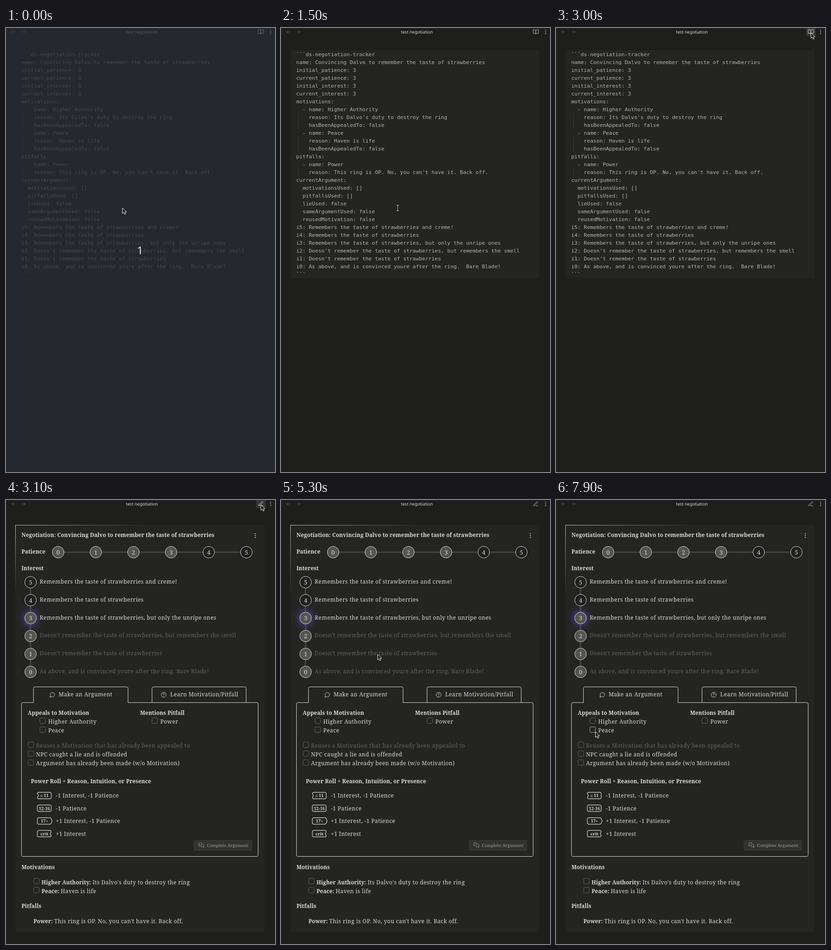
Write an HTML page with a canvas that moves like this. It is 583 by 961 pixels and loops after 8 s.

```html
<!DOCTYPE html>
<html lang="en">
<head>
<meta charset="utf-8">
<title>test negotiation</title>
<style>
html, body { margin: 0; width: 100%; height: 100%; overflow: hidden; background: #1e1e1c; }
canvas { display: block; }
</style>
</head>
<body>
<canvas id="stage" width="583" height="961"></canvas>
<script>
const ctx = document.getElementById('stage').getContext('2d');
const LOOP = 8000, TICK = 100;
const SERIF = '"Noto Serif", serif', SANS = '"Noto Sans", sans-serif';
const REGULAR = `12px ${SERIF}`, BOLD = `bold 11.8px ${SERIF}`;
const TRACKING = { [REGULAR]: '0.43px', [BOLD]: '0.08px' };
const MONO = '11.33px "DejaVu Sans Mono", monospace';
const BG = '#1e1e1c', PANEL = '#242422', LIGHT = '#dadada', DIM = '#62625f';

const GOALS = [
  "Remembers the taste of strawberries and creme!",
  "Remembers the taste of strawberries",
  "Remembers the taste of strawberries, but only the unripe ones",
  "Doesn't remember the taste of strawberries, but remembers the smell",
  "Doesn't remember the taste of strawberries",
  "As above, and is convinced youre after the ring.  Bare Blade!"
];
const TOPIC = 'Convincing Dalvo to remember the taste of strawberries';
const DUTY = "Its Dalvo's duty to destroy the ring";
const REFUSAL = "This ring is OP. No, you can't have it. Back off.";

const SOURCE = `\`\`\`ds-negotiation-tracker
name: ${TOPIC}
initial_patience: 3
current_patience: 3
initial_interest: 3
current_interest: 3
motivations:
  - name: Higher Authority
    reason: ${DUTY}
    hasBeenAppealedTo: false
  - name: Peace
    reason: Haven is life
    hasBeenAppealedTo: false
pitfalls:
  - name: Power
    reason: ${REFUSAL}
currentArgument:
  motivationsUsed: []
  pitfallsUsed: []
  lieUsed: false
  sameArgumentUsed: false
  reusedMotivation: false
${GOALS.map((g, i) => `i${5 - i}: ${g}`).join('\n')}
\`\`\``.split('\n');

const ICONS = {
  back: 'M12 19l-7-7 7-7M19 12H5',
  forward: 'M12 5l7 7-7 7M5 12h14',
  book: 'M2 3h6a4 4 0 0 1 4 4v14a3 3 0 0 0-3-3H2zM22 3h-6a4 4 0 0 0-4 4v14a3 3 0 0 1 3-3h7z',
  pencil: 'M12 20h9M16.5 3.5a2.12 2.12 0 0 1 3 3L7 19l-4 1 1-4Z',
  bubble: 'M7.9 20A9 9 0 1 0 4 16.1L2 22Z',
  help: 'M12 2a10 10 0 1 0 0 20a10 10 0 1 0 0-20M9.1 9a3 3 0 0 1 5.8 1c0 2-3 3-3 3M12 17h.01',
  chats: 'M14 9a2 2 0 0 1-2 2H6l-4 4V4a2 2 0 0 1 2-2h8a2 2 0 0 1 2 2zM18 9h2a2 2 0 0 1 2 2v11l-4-4h-6a2 2 0 0 1-2-2v-1'
};

function text(s, x, y, font = REGULAR, color = LIGHT, align = 'left') {
  ctx.font = font;
  ctx.letterSpacing = TRACKING[font] || '0px';
  ctx.fillStyle = color;
  ctx.textAlign = align;
  ctx.fillText(s, x, y);
}

function icon(name, x, y, color, scale = 0.53) {
  ctx.save();
  ctx.translate(x, y);
  ctx.scale(scale, scale);
  ctx.translate(-12, -12);
  ctx.lineWidth = 1.8;
  ctx.lineCap = ctx.lineJoin = 'round';
  ctx.strokeStyle = color;
  ctx.stroke(new Path2D(ICONS[name]));
  ctx.restore();
}

function box(x, y, w, h, r, fill, stroke) {
  ctx.beginPath();
  ctx.roundRect(x, y, w, h, r);
  if (fill) { ctx.fillStyle = fill; ctx.fill(); }
  if (stroke) { ctx.strokeStyle = stroke; ctx.lineWidth = 1; ctx.stroke(); }
}

function rect(x, y, w, h, color) {
  ctx.fillStyle = color;
  ctx.fillRect(x, y, w, h);
}

function dots(x, y, gap, color) {
  ctx.fillStyle = color;
  for (const k of [-1, 0, 1]) {
    ctx.beginPath();
    ctx.arc(x, y + k * gap, 1.1, 0, 7);
    ctx.fill();
  }
}

function header(mode, hover, ink = LIGHT, arrows = '#555553', tool = '#b0b0ae') {
  if (hover) box(542, 0, 21, 18, [0, 0, 3, 3], '#363635');
  icon('back', 16, 8.5, arrows);
  icon('forward', 38, 8.5, arrows);
  text('test negotiation', 294.5, 12, `9.25px ${SANS}`, ink, 'center');
  icon(mode, 552.3, 8.3, hover ? LIGHT : tool);
  dots(573.5, 8.5, 3.7, tool);
}

function editor(ink, guide) {
  for (const [y, h] of [[184, 34], [235, 34], [303, 17]]) rect(37, y, 1, h, guide);
  SOURCE.forEach((line, i) => text(line, 33, 60.5 + 17 * i, MONO, ink));
}

function countdown() {
  rect(0, 0, 583, 961, '#25282f');
  header('book', false, '#55585c', '#3a3d42', '#6d7074');
  editor('#45484c', '#2d3036');
  text('1', 290.5, 489.5, `23px ${SANS}`, '#e4e4e4', 'center');
}

function node(n, x, y, filled, glow) {
  ctx.save();
  if (glow) { ctx.shadowColor = '#6a50e0'; ctx.shadowBlur = 17; }
  ctx.beginPath();
  ctx.arc(x, y, 12.6, 0, 7);
  ctx.fillStyle = filled ? '#545453' : '#20201e';
  ctx.fill();
  ctx.restore();
  ctx.strokeStyle = LIGHT;
  ctx.lineWidth = 1;
  ctx.stroke();
  text(n, x, y + 4.7, `13px ${SERIF}`, LIGHT, 'center');
}

function check(x, y, color = '#62625f') {
  box(x + .5, y + .5, 12, 12, 2.5, null, color);
}

function fade(x, y, w, h) {
  const g = ctx.createLinearGradient(x, y, w > h ? x + w : x, w > h ? y : y + h);
  g.addColorStop(0, '#c4c4c2');
  g.addColorStop(1, 'rgba(196,196,194,0)');
  rect(x, y, w, h, g);
}

// Outcome badge; left and right edges bend by l and r pixels.
function badge(label, y, l, r) {
  ctx.beginPath();
  ctx.moveTo(70, y - 7);
  ctx.lineTo(96, y - 7);
  ctx.lineTo(98, y - 5);
  ctx.lineTo(98 + r, y);
  ctx.lineTo(98, y + 5);
  ctx.lineTo(96, y + 7);
  ctx.lineTo(70, y + 7);
  ctx.lineTo(68, y + 5);
  ctx.lineTo(68 + l, y);
  ctx.lineTo(68, y - 5);
  ctx.closePath();
  ctx.strokeStyle = LIGHT;
  ctx.lineWidth = 1.2;
  ctx.stroke();
  text(label, 83.3, y + 3.4, `bold 9.4px ${SERIF}`, LIGHT, 'center');
}

function entry(name, rest, x, y) {
  text(name, x, y, BOLD);
  const w = ctx.measureText(name + ' ').width;
  text(rest, x + w, y);
}

function tracker(hoverPeace) {
  rect(21, 54, 539, 881, PANEL);
  fade(20, 54, 290, 1);
  fade(20, 54, 1, 155);

  text('Negotiation: ' + TOPIC, 33.5, 80, BOLD);
  dots(540.3, 77, 4, LIGHT);
  text('Patience', 33.5, 116, BOLD);
  rect(113, 111.5, 408, 3, '#434342');
  for (let i = 0; i < 6; i++) node(i, 113 + 81.6 * i, 113, i <= 3);

  text('Interest', 33.5, 151.5, BOLD);
  rect(51.5, 178, 3, 194, '#434342');
  GOALS.forEach((goal, i) => {
    node(5 - i, 53.3, 178 + 38.8 * i, i > 1, i === 2);
    text(goal.replace('  ', ' '), 73, 181 + 38.8 * i, REGULAR, i > 2 ? DIM : LIGHT);
  });

  box(33.5, 438.5, 513, 333, 3, PANEL, LIGHT);
  box(59.5, 404.5, 205, 34, [3, 3, 0, 0], null, LIGHT);
  box(316.5, 404.5, 204, 34, [3, 3, 0, 0], null, LIGHT);
  rect(60, 437.5, 204, 2, PANEL);
  icon('bubble', 100.5, 421.5, LIGHT);
  text('Make an Argument', 114, 425);
  icon('help', 341.7, 421.5, LIGHT);
  text('Learn Motivation/Pitfall', 356, 425);

  text('Appeals to Motivation', 47, 464.5, BOLD);
  text('Mentions Pitfall', 290.5, 464.5, BOLD);
  check(73, 471);
  text('Higher Authority', 91.5, 483.5);
  check(73, 490.5, hoverPeace ? '#a8a8a6' : undefined);
  text('Peace', 91.5, 503);
  check(316, 471);
  text('Power', 334.5, 483.5);

  ['Reuses a Motivation that has already been appealed to',
    'NPC caught a lie and is offended',
    'Argument has already been made (w/o Motivation)'].forEach((s, i) => {
    check(47.5, 523 + 19.4 * i);
    text(s, 65, 535.5 + 19.4 * i, REGULAR, i ? LIGHT : DIM);
  });

  text('Power Roll + Reason, Intuition, or Presence', 54, 613, BOLD);
  [['≤ 11', 2, 0, '-1 Interest, -1 Patience'],
    ['12-16', 0, 0, '-1 Patience'],
    ['17+', 0, 2, '+1 Interest, -1 Patience'],
    ['crit', 0, -2, '+1 Interest']].forEach(([label, l, r, s], i) => {
    const y = 639.7 + 27.5 * i;
    badge(label, y, l, r);
    text(s, 108, y + 4.3);
  });

  box(407.5, 736.5, 125.5, 22, 3, '#323231', '#393938');
  icon('chats', 423.5, 747.3, '#9c9c9a');
  text('Complete Argument', 435.5, 751, `9.4px ${SERIF}`, '#9c9c9a');

  text('Motivations', 33.5, 798.5, BOLD);
  check(59.5, 818.5);
  entry('Higher Authority:', DUTY, 77, 831.5);
  check(59.5, 838);
  entry('Peace:', 'Haven is life', 77, 850.5);
  text('Pitfalls', 33.5, 883, BOLD);
  entry('Power:', REFUSAL, 59.5, 915.5);
}

// Pointer moves: start, end, destination x, y.
const MOVES = [
  [1400, 1401, 253, 389],
  [1500, 2300, 542, 37],
  [2300, 2800, 552, 10],
  [4300, 4400, 550, 12],
  [4400, 4600, 549, 18],
  [4700, 5600, 90, 444],
  [5600, 6200, 70, 519],
  [7000, 7600, 85, 503],
  [7700, 7900, 85, 501.5]
];

function pointer(t) {
  let x = 252, y = 390;
  for (const [from, to, tx, ty] of MOVES) {
    const p = Math.min(1, Math.max(0, (t - from) / (to - from)));
    const e = p * p * (3 - 2 * p);
    x += (tx - x) * e;
    y += (ty - y) * e;
  }
  return [x, y];
}

function arrow(x, y) {
  ctx.save();
  ctx.translate(x + .5, y + .5);
  ctx.lineJoin = 'round';
  ctx.lineWidth = 1;
  ctx.fillStyle = '#161616';
  ctx.strokeStyle = '#f2f2f2';
  const p = new Path2D('M0 0V11.8L2.9 9.3L4.9 13.7L7 12.7L5 8.5H8.8Z');
  ctx.fill(p);
  ctx.stroke(p);
  ctx.restore();
}

function beam(x, y) {
  ctx.save();
  ctx.translate(Math.round(x), Math.round(y));
  for (const [grow, color] of [[1, '#111'], [0, '#f2f2f2']]) {
    for (const [bx, by, w, h] of [[-.5, -5, 1, 11], [-2.5, -6, 5, 1], [-2.5, 6, 5, 1]])
      rect(bx - grow, by - grow, w + 2 * grow, h + 2 * grow, color);
  }
  ctx.restore();
}

function draw(t) {
  if (t < 100) {
    countdown();
    arrow(252, 389);
    return;
  }
  const [x, y] = pointer(t);
  const hover = x > 541 && y < 17;
  rect(0, 0, 583, 961, BG);
  if (t < 3100) {
    header('book', hover);
    box(20.5, 48, 539.5, 493.5, 3, PANEL);
    editor('#b3b3b0', '#3b3b39');
    (y < 48 ? arrow : beam)(x, y);
  } else {
    header('pencil', hover);
    tracker(t >= 7500);
    arrow(x, y);
  }
}

let shown = -1;
const start = performance.now();
function loop() {
  const t = Math.floor((performance.now() - start) % LOOP / TICK) * TICK;
  if (t !== shown) draw(shown = t);
  requestAnimationFrame(loop);
}
loop();
</script>
</body>
</html>
```
